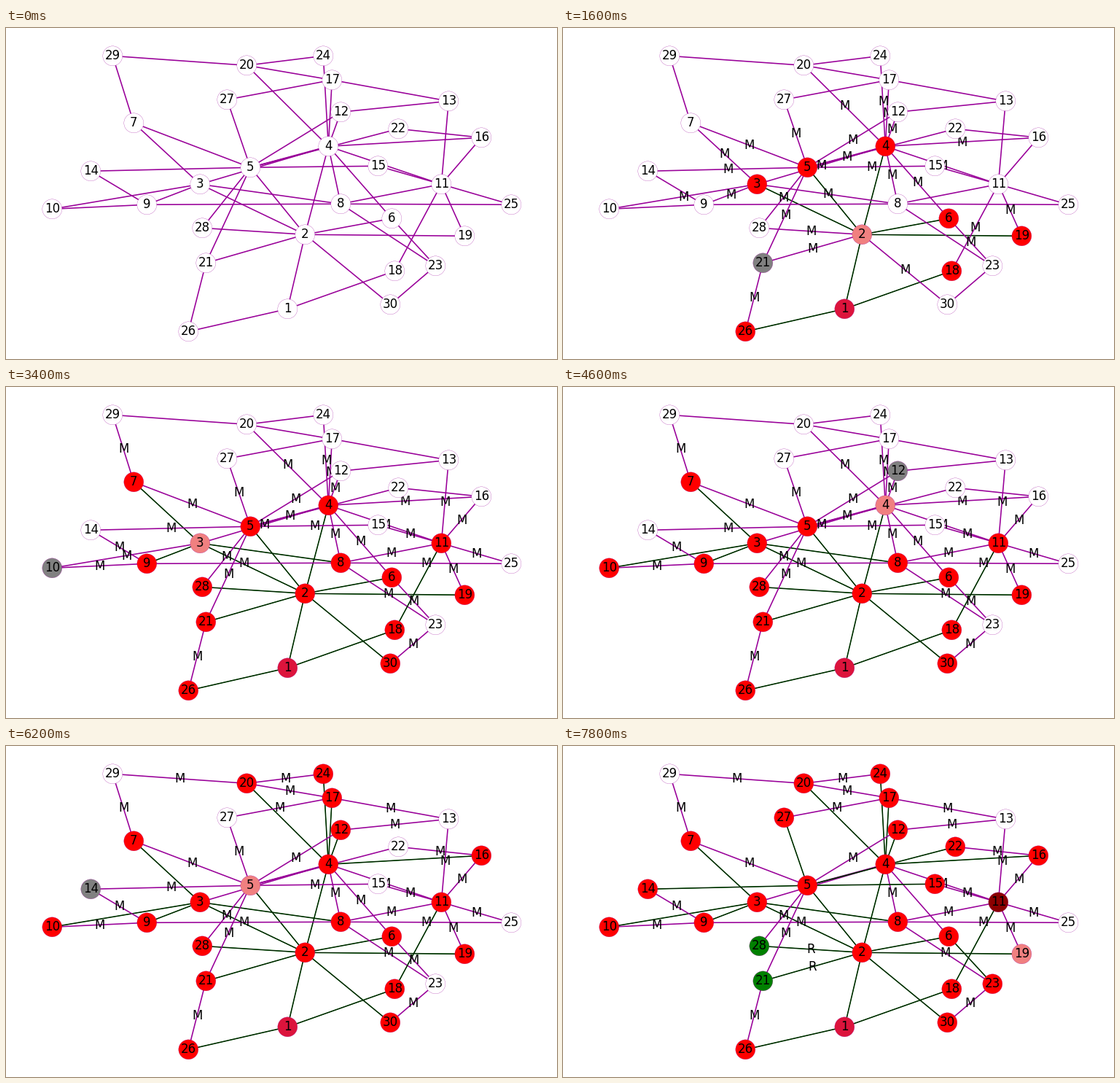
Animation of 756 by 454 pixels, one loop 8000 ms. Source, as a matplotlib script:

```python
from collections import deque

import matplotlib.pyplot as plt
from matplotlib.animation import FuncAnimation
from matplotlib.patches import Circle

W, H, DPI = 756, 454, 64
PT = 72 / DPI  # points per pixel
FRAMES, STEP_MS = 40, 200
RADIUS, FONT, LINE = 13.5, 16.6, 1.6
NUDGE = 0.3
PURPLE, GREEN = "#990099", "#006400"

# One key point per node, in order of node number.
POINTS = [
    (386, 385), (410, 283), (266, 214), (442, 162), (335, 191),
    (529, 261), (175, 130), (459, 241), (193, 242), (63, 248),
    (597, 214), (459, 115), (607, 100), (116, 196), (510, 189),
    (652, 150), (447, 71), (533, 333), (629, 285), (330, 51),
    (274, 322), (538, 138), (589, 326), (435, 38), (693, 242),
    (250, 416), (303, 98), (269, 274), (146, 38), (527, 379),
]
POS = {n: (x + NUDGE, y + NUDGE) for n, (x, y) in enumerate(POINTS, 1)}

# Each hub with the later nodes that joined it.
LINKS = {
    1: (2, 18, 26),
    2: (3, 4, 5, 6, 19, 21, 28, 30),
    3: (4, 7, 8, 9, 10),
    4: (5, 6, 8, 11, 12, 16, 17, 20, 24),
    5: (7, 12, 14, 15, 21, 22, 27, 28),
    6: (23,), 7: (29,), 8: (9, 11, 23, 25), 9: (10, 14),
    11: (13, 15, 16, 18, 19, 25),
    12: (13,), 13: (17,), 16: (22,), 17: (20, 27),
    20: (24, 29), 21: (26,), 23: (30,),
}
EDGES = [(a, b) for a, ends in LINKS.items() for b in ends]
NEAR = {n: sorted(a + b - n for a, b in EDGES if n in (a, b)) for n in POS}


def key(a, b):
    return min(a, b), max(a, b)


def flood(root, count):
    """Return (node colours, edge labels, tree edges) for every frame."""
    color = {n: "white" for n in POS}
    states = [(dict(color), {}, set())]
    labels, tree, parent = {}, set(), {root: None}
    heard = {n: set() for n in POS}
    queue = deque()

    def send_all(node):
        for other in NEAR[node]:
            if other != parent[node]:
                queue.append((node, other))
                labels[key(node, other)] = "M"

    def deliver(src, dst):
        heard[dst].add(src)
        if dst not in parent:
            parent[dst] = src
            color[dst] = "red"
            tree.add(key(src, dst))
            labels.pop(key(src, dst), None)
            send_all(dst)
            return
        if len(heard[dst]) > 2:
            for other in heard[dst]:
                if dst in heard[other]:
                    labels.pop(key(dst, other), None)
        if len(heard[dst]) == len(NEAR[dst]):
            color[dst] = "green"
            labels[key(dst, parent[dst])] = "R"

    color[root] = "crimson"
    send_all(root)
    deliver(*queue.popleft())
    while len(states) < count:
        src, dst = queue.popleft()
        shown = dict(color)
        shown[src] = "lightcoral"
        shown[dst] = "darkred" if dst in parent else "gray"
        states.append((shown, dict(labels), set(tree)))
        deliver(src, dst)
    return states


STATES = flood(1, FRAMES)

plt.rcParams["font.family"] = "DejaVu Sans"
fig = plt.figure(figsize=(W / DPI, H / DPI), dpi=DPI, facecolor="white")
ax = fig.add_axes([0, 0, 1, 1])
ax.set_xlim(0, W)
ax.set_ylim(H, 0)
ax.axis("off")


def write(x, y, text, z):
    return ax.text(x, y, text, fontsize=FONT * PT, color="black",
                   ha="center", va="center", zorder=z)


def stroke(edge, width, color, z):
    xs, ys = zip(*(POS[n] for n in edge))
    return ax.plot(xs, ys, lw=width * PT, color=color, zorder=z)[0]


lines, cores, tags, discs = {}, {}, {}, {}
for i, edge in enumerate(EDGES):
    z = 1 + i / 100
    lines[edge] = stroke(edge, LINE, PURPLE, z)
    cores[edge] = stroke(edge, LINE / 2, "black", z + 0.005)
    x, y = (sum(c) / 2 for c in zip(*(POS[n] for n in edge)))
    tags[edge] = write(x + NUDGE, y + NUDGE, "", 3)
for n, (x, y) in POS.items():
    discs[n] = ax.add_patch(Circle((x, y), RADIUS, lw=0.25 * PT,
                                   ec=PURPLE, fc="white", zorder=4))
    write(x, y, str(n), 5)


def draw(i):
    color, labels, tree = STATES[i]
    for n, disc in discs.items():
        disc.set_facecolor(color[n])
    for e in EDGES:
        lines[e].set_color(GREEN if e in tree else PURPLE)
        cores[e].set_visible(e in tree)
        tags[e].set_text(labels.get(e, ""))
    return [*lines.values(), *cores.values(), *tags.values(), *discs.values()]


anim = FuncAnimation(fig, draw, frames=FRAMES, init_func=lambda: draw(0),
                     interval=STEP_MS, repeat=True, repeat_delay=0, blit=False)
plt.show()
```
